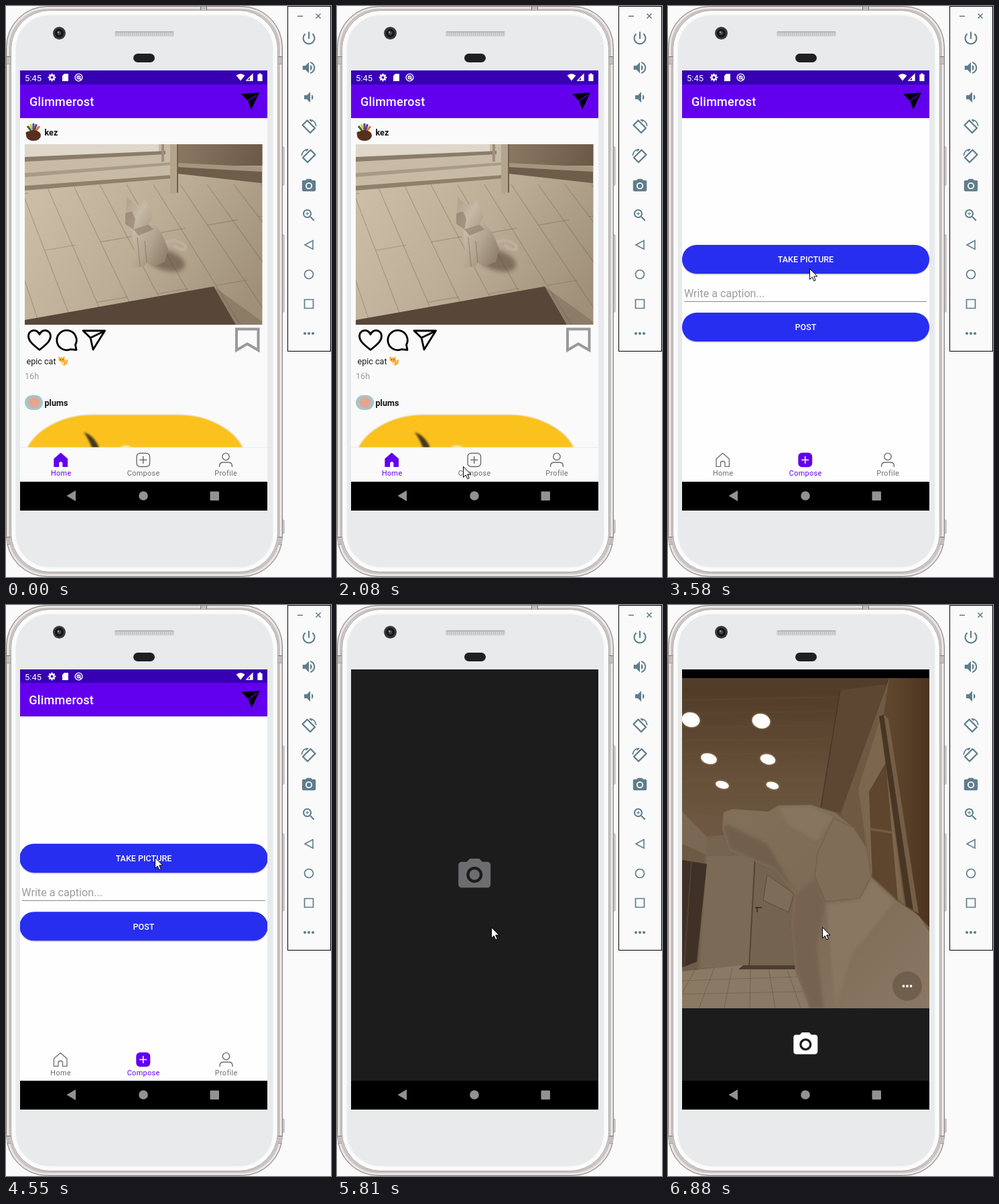
Recreate the animation shown at these times as an HTML page with a canvas. Size 485x851 px, loop 8000 ms.

```html
<!DOCTYPE html>
<html lang="en">
<head>
<meta charset="utf-8">
<title>Phone emulator demo</title>
<style>
html, body { margin: 0; width: 100%; height: 100%; overflow: hidden; background: #fafafa; }
canvas { display: block; width: 485px; height: 851px; }
</style>
</head>
<body>
<canvas id="stage" width="485" height="851"></canvas>
<script>
const c = document.getElementById('stage').getContext('2d');
const LOOP = 8000;
const PURPLE = '#6200ee', DARK = '#1c1c1c', GREY = '#6c6c6c', SLATE = '#5f7d8b';

// [time, x, y] of the pointer tip
const POINTER = [
  [1000, 184, 799], [1150, 152, 722], [1270, 81, 600], [1390, 118, 530], [1550, 150, 524],
  [1690, 178, 556], [1810, 195, 622], [1930, 189, 670], [2080, 188, 686],
  [3040, 186, 650], [3160, 185, 617], [3310, 187, 510], [3430, 192, 418], [3580, 211, 391],
  [3730, 217, 382], [3860, 222, 376], [5250, 226, 424], [5370, 230, 480]
];

const CAMERA = 'M9 2L7.17 4H4c-1.1 0-2 .9-2 2v12c0 1.1.9 2 2 2h16c1.1 0 2-.9 2-2V6c0-1.1-.9-2-2-2h-3.17L15 2H9zm3 15c-2.76 0-5-2.24-5-5s2.24-5 5-5 5 2.24 5 5-2.24 5-5 5z';
const POWER = 'M13 3h-2v10h2V3zm4.83 2.17l-1.42 1.42C17.99 7.86 19 9.81 19 12c0 3.87-3.13 7-7 7s-7-3.13-7-7c0-2.19 1.01-4.14 2.58-5.42L6.17 5.17C4.23 6.82 3 9.26 3 12c0 4.97 4.03 9 9 9s9-4.03 9-9c0-2.74-1.23-5.18-3.17-6.83z';
const LOUD = 'M3 9v6h4l5 5V4L7 9H3zm13.5 3c0-1.77-1.02-3.29-2.5-4.03v8.05c1.48-.73 2.5-2.25 2.5-4.02zM14 3.23v2.06c2.89.86 5 3.54 5 6.71s-2.11 5.85-5 6.71v2.06c4.01-.91 7-4.49 7-8.77s-2.99-7.86-7-8.77z';
const QUIET = 'M18.5 12c0-1.77-1.02-3.29-2.5-4.03v8.05c1.48-.73 2.5-2.25 2.5-4.02zM5 9v6h4l5 5V4L9 9H5z';
const ZOOM = 'M15.5 14h-.79l-.28-.27C15.41 12.59 16 11.11 16 9.5 16 5.91 13.09 3 9.5 3S3 5.91 3 9.5 5.91 16 9.5 16c1.61 0 3.09-.59 4.23-1.57l.27.28v.79l5 4.99L20.49 19l-4.99-5zm-6 0C7.01 14 5 11.99 5 9.5S7.01 5 9.5 5 14 7.01 14 9.5 11.99 14 9.5 14zM12 10h-2v2H9v-2H7V9h2V7h1v2h2v1z';

function box(x, y, w, h, fill) { c.fillStyle = fill; c.fillRect(x, y, w, h); }

function shape(path, fill, line, width = 1) {
  const p = path instanceof Path2D ? path : new Path2D(path);
  if (fill) { c.fillStyle = fill; c.fill(p, 'evenodd'); }
  if (line) { c.strokeStyle = line; c.lineWidth = width; c.stroke(p); }
}

function round(x, y, w, h, r, fill, line, width) {
  const p = new Path2D();
  p.roundRect(x, y, w, h, r);
  shape(p, fill, line, width);
}

function oval(x, y, rx, ry, fill, line, width, turn = 0) {
  const p = new Path2D();
  p.ellipse(x, y, rx, ry, turn, 0, 7);
  shape(p, fill, line, width);
}

const dot = (x, y, r, fill, line, width) => oval(x, y, r, r, fill, line, width);

function icon(path, x, y, size, fill) {
  c.save();
  c.translate(x, y);
  c.scale(size, size);
  c.translate(-12, -12);
  shape(path, fill);
  c.restore();
}

function camera(x, y, size, fill) {
  icon(CAMERA, x, y, size, fill);
  dot(x, y, 3.2 * size, fill);
}

function rotateIcon(y, flip) {
  c.save();
  c.translate(452, y);
  c.scale(flip, 1);
  c.lineJoin = 'round';
  shape('M-2.5 -9.5L9 2L2 9L-9.5 -2.5Z', null, SLATE, 2.3);
  shape('M1 -10.500Q9.500 -10 10.800 -1M1 -10.500L4.500 -7.500', null, SLATE, 1.6);
  c.restore();
}

function text(str, x, y, size, fill, { weight = 400, space = 0, align = 'left' } = {}) {
  c.font = `${weight} ${size}px Roboto, sans-serif`;
  c.letterSpacing = space + 'px';
  c.textAlign = align;
  c.fillStyle = fill;
  c.fillText(str, x, y);
  c.letterSpacing = '0px';
}

function fade(x0, y0, x1, y1, ...stops) {
  const g = c.createLinearGradient(x0, y0, x1, y1);
  stops.forEach((s, i) => g.addColorStop(i / (stops.length - 1), s));
  return g;
}

function clipped(x, y, w, h, draw) {
  c.save();
  c.beginPath();
  c.rect(x, y, w, h);
  c.clip();
  draw();
  c.restore();
}

function soft(blur, draw) {
  c.save();
  c.filter = `blur(${blur}px)`;
  draw();
  c.restore();
}

function phone() {
  for (const [y, h] of [[210, 57], [341, 115], [766, 20]])
    round(411, y, 4, h, 1, '#d6d1d1', '#aaa5a5');
  round(.5, .5, 412, 850, 61, '#d3cdcc', '#8a8585');
  round(3, 3, 407, 845, 59, null, '#eeeaea', 2);
  round(5.5, 5, 402, 840, 58, null, '#b9b3b3', 1);
  for (const y of [75, 791]) {
    for (const x of [1, 406]) {
      box(x, y, 6, 12, '#c3bdbd');
      box(x, y, 6, 1, '#7d7878');
      box(x, y + 11, 6, 1, '#a5a0a0');
    }
  }
  box(291, 1, 9, 4, '#c3bdbd');
  box(290, 1, 1, 5, '#777');
  box(299, 1, 1, 5, '#777');
  round(7.5, 6.5, 398, 837, 58, '#fdfdfd', '#aaa5a5');
  c.save();
  c.shadowColor = '#e8eaec';
  c.shadowBlur = 4;
  round(15, 14, 383, 822, 50, '#e8eaec');
  c.restore();
  dot(79.5, 40.5, 9.5, '#3a3a3c');
  dot(79.5, 40.5, 6.5, '#161618');
  dot(79.5, 40.5, 3, '#454a50');
  dot(78, 39, 1.2, '#a0a5aa');
  round(162, 37.5, 89, 8, 2, '#d2d3d5');
  box(163, 38, 87, 1.3, '#a5a6a9');
  for (let x = 164; x < 250; x += 3) box(x, 40, 1, 4, '#bdbec1');
  round(190, 71, 32, 13, 6.5, '#202022');
}

function toolbar() {
  box(420, 0, 65, 515, '#000');
  box(421, 1, 63, 513, '#fafafa');
  box(435, 14.5, 8, 1.5, SLATE);
  shape('M462.5 11.5l7 7m0-7l-7 7', null, SLATE, 1.6);
  icon(POWER, 452, 48, 1.05, SLATE);
  icon(LOUD, 452, 92, 1.03, SLATE);
  icon(QUIET, 452, 136, 1, SLATE);
  rotateIcon(180, 1);
  rotateIcon(224, -1);
  camera(452, 268, 1.02, SLATE);
  icon(ZOOM, 452, 312, 1, SLATE);
  shape('M446 356L458 349.5V362.5Z', null, SLATE, 1.6);
  dot(452, 400, 6.5, null, SLATE, 1.7);
  shape('M445.5 437.5h13v13h-13z', null, SLATE, 1.7);
  for (const x of [446, 452, 458]) dot(x, 488, 2.1, SLATE);
}

function status() {
  text('5:45', 28, 111.5, 13, '#fff');
  dot(68.5, 106.5, 3.2, null, '#fff', 2.4);
  for (let i = 0; i < 8; i++) {
    const a = i * Math.PI / 4;
    dot(68.5 + 4.9 * Math.cos(a), 106.5 + 4.9 * Math.sin(a), 1.15, '#fff');
  }
  shape('M87 101h6v11h-9v-8z', '#fff');
  dot(108.5, 106.5, 5.4, null, '#fff', 1.4);
  dot(108.5, 106.5, 2.4, null, '#fff', 1.3);
  shape('M106 104l6 6', null, '#fff', 1.3);
  shape('M343.5 103.5Q350 98.5 356.5 103.5L350 111.5Z', '#fff');
  shape('M359 111L368 101.8V111Z', null, '#fff', 1.3);
  shape('M364 106l4-4v9h-4z', '#fff');
  shape('M377.2 100.5h3.4v1.5h2v10h-7.2v-10h1.8z', '#fff');
}

function appBar() {
  box(21, 166, 369, 3, fade(0, 166, 0, 169, 'rgba(0,0,0,.14)', 'rgba(0,0,0,0)'));
  box(21, 116, 369, 51, PURPLE);
  text('Glimmerost', 35, 149, 18, '#fff', { weight: 500, space: .24 });
  shape('M351 131L378 129L366 154.5L361 141.5Z', '#000');
  shape('M361 141.5L373.5 133', null, PURPLE, 1.2);
}

function tabs(active) {
  const tint = i => i === active ? PURPLE : GREY;
  box(21, 658, 369, 51, active ? '#fefefe' : '#fafafa');
  if (!active) box(21, 657.5, 369, 1, '#ececec');
  ['Home', 'Compose', 'Profile'].forEach((s, i) =>
    text(s, 82.2 + 123 * i, 699.5, 10.8, tint(i), { space: .38, align: 'center' }));
  c.lineJoin = 'round';
  const home = 'M72 675L81.7 666.6L91.4 675V686.4H85V681Q85 678.5 81.7 678.5Q78.5 678.5 78.5 681V686.4H72Z';
  shape(home, active ? null : PURPLE, tint(0), 1.3);
  round(195, 666.5, 19.5, 20, 5, active ? PURPLE : null, tint(1), 1.4);
  shape('M204.7 671v11m-5.5-5.5h11', null, active ? '#fff' : GREY, 1.5);
  dot(328, 671.6, 5.2, null, GREY, 1.4);
  shape('M318.6 687v-1.5q0-5.2 5.4-5.2h8q5.4 0 5.4 5.2v1.5', null, GREY, 1.4);
  c.lineJoin = 'miter';
}

function systemBar() {
  box(21, 709, 369, 43, '#000');
  shape('M90.5 730L104 722V738Z', '#929292');
  dot(205, 730, 6.8, '#929292');
  round(304.5, 723.5, 13.5, 13.5, 1, '#929292');
}

function catPhoto() {
  clipped(28, 206, 354.5, 269, () => {
    box(28, 206, 355, 269, fade(60, 250, 360, 450, '#cbbda6', '#bcad97', '#a09079'));
    // floor boards
    for (let i = 0; i < 11; i++) {
      const x = i * 40 - 20, lean = 35 + i * 5;
      shape(`M${x} 266L${x + lean * 2} 475`, null, 'rgba(92,76,58,.3)', 1.2);
      const t = (i * 37 % 80) / 100 + .1;
      shape(`M${x + lean * 2 * t} ${266 + 209 * t}l46 -8`, null, 'rgba(92,76,58,.3)', 1.2);
    }
    // window, sill and skirting
    shape('M28 206H246V256L28 274Z', '#c8bba5');
    shape('M28 206H228V217L28 227Z', '#ded7ca');
    shape('M28 225L238 216V221L28 232Z', '#8b7c6a');
    shape('M28 249L246 233V237L28 255Z', '#a99a85');
    shape('M28 268L246 252V257L28 275Z', '#8f7f6b');
    // furniture
    box(257, 206, 126, 32, fade(257, 206, 382, 238, '#8b7863', '#6b5947'));
    shape('M257 234L382 240V247L257 240Z', '#a6957e');
    shape('M257 240L382 247V264L257 250Z', '#6f5d4b');
    box(245, 206, 12, 73, '#b5a48d');
    box(255, 206, 2, 72, '#6f5e4c');
    box(232, 206, 4, 26, '#a08f7a');
    shape('M28 468L310 418L343 475H28Z', '#584639');
    shape('M310 418L382 470V475H343Z', 'rgba(95,78,62,.3)');
    // cat
    soft(3, () => oval(238, 379, 30, 15, 'rgba(82,65,49,.55)', null, 1, .3));
    shape('M232 356Q248 346 257 351Q271 356 267 363Q258 364 250 356', null, '#beb09b', 4.5);
    shape('M187 324L216 318L232 338L242 362L237 381L222 388L210 382L206 389L188 390L191 360Z',
      fade(190, 340, 240, 366, '#c6b9a5', '#b3a48f', '#93836f'));
    shape('M196 345L200 388M207 350L210 382', null, 'rgba(110,93,74,.4)', 1.5);
    shape('M180 284L192 295L201 296L207 288L215 301L218 316L211 328L190 334L178 325L179 307Z',
      fade(180, 300, 217, 322, '#b5a692', '#c6b9a5', '#b0a18c'));
    shape('M178 309L188 306L193 318L190 333L178 325Z', 'rgba(120,102,83,.45)');
    shape('M190 333L213 326L220 333L198 342Z', 'rgba(110,93,74,.4)');
  });
}

function feed() {
  box(21, 167, 369, 491, '#fafafa');
  // avatars
  ['#2f6b32', '#e6c524', '#3550a8', '#7a2c8c', '#d87722'].forEach((col, i) =>
    shape(`M41 190l${-9 + i * 4.5} ${-11 - 4 * Math.sin(i * .8)}`, null, col, 3));
  oval(41, 193, 11, 8, '#57301d');
  oval(33, 190, 3.5, 3, '#57301d');
  text('kez', 57.5, 193, 12.6, '#111', { weight: 700 });
  catPhoto();

  // actions
  c.lineJoin = 'round';
  shape('M50 512.5C38 503 33.5 498.5 33.5 492C33.5 486.5 37.5 483.5 41.5 483.5C46 483.5 48.5 486 50 489.5C51.5 486 54 483.5 58.5 483.5C62.5 483.5 66.5 486.5 66.5 492C66.5 498.5 62 503 50 512.5Z', null, '#000', 2.8);
  shape('M105 512.5L96 511.7A14.7 14.7 0 1 1 103.5 505Z', null, '#000', 2.8);
  shape('M115 484H147.5L130 512L126 494.5ZM126 494.5L147 484.5', null, '#000', 2.8);
  c.lineJoin = 'miter';
  shape('M344 481.5H376.5V513L360 503.5L344 513Z', null, '#999', 4);

  text('epic cat', 30.5, 533.5, 12.6, '#1a1a1a');
  // cat emoji
  shape('M86 535q6-1 5-8', null, '#f0a22e', 2);
  oval(86, 531, 3.5, 4.5, '#f5b23d');
  shape('M78.5 522l3 2h3l3-2v6q-4.5 5-9 0z', '#f5b23d');
  dot(81.5, 527, .8, '#4a3320');
  dot(85, 527, .8, '#4a3320');
  box(83, 531, 3, 4, '#fbe1a4');
  text('16h', 28, 555.5, 12.6, '#9a9a9a');

  round(28, 580, 27, 22, 11, '#a9c4c8');
  dot(42, 591, 8, '#e5a58e');
  text('plums', 57.5, 595.5, 12.6, '#111', { weight: 700 });
  clipped(21, 604, 369, 54, () => {
    shape('M30 662C42 632 84 609 128 609H258C302 609 344 632 355 662Z', '#fbc21d', '#ece3c4', 1.5);
    soft(1.5, () => {
      shape('M116 635Q133 641 140 661H129Q125 648 116 635Z', '#43371c');
      oval(179, 659, 8, 4, '#fff3c4');
    });
  });
}

function button(y, label, glow) {
  round(21, y + 1.5, 369, 43, 21.5, 'rgba(0,0,0,.2)');
  round(21, y, 369, 43, 21.5, '#272ef0');
  if (glow) round(21, y, 369, 43, 21.5, 'rgba(255,255,255,.22)');
  text(label, 205.5, y + 26.3, 12.5, '#fff', { weight: 500, align: 'center' });
}

function compose(t) {
  box(21, 167, 369, 491, '#fefefe');
  button(356, 'TAKE PICTURE', t >= 4000 && t < 4120);
  text('Write a caption...', 24, 434, 16.1, '#9c9c9c');
  box(24.5, 440, 361.5, 1, '#898989');
  button(457, 'POST');
}

function app(t) {
  const active = t < 2530 ? 0 : 1;
  clipped(21, 96, 369, 656, () => {
    c.save();
    if (t >= 4550) {
      c.translate(205.5, 424);
      c.scale(1.004, 1.004);
      c.translate(-205.5, -424);
    }
    if (active) compose(t); else feed();
    appBar();
    tabs(active);
    if (t >= 2530 && t < 2790) {
      const [r, alpha] = t < 2670 ? [50, .14] : [67, .07];
      clipped(21, 658, 369, 51, () => dot(205, 683, r, `rgba(98,0,238,${alpha})`));
    }
    c.restore();
    box(21, 96, 369, t >= 4550 ? 20 : 21, '#3700b3');
    status();
  });
}

function roomPhoto() {
  clipped(21, 109, 369, 492, () => {
    // ceiling
    box(21, 109, 369, 492, fade(0, 109, 0, 400, '#4e3926', '#665039', '#6f5c48'));
    for (let i = 0; i < 9; i++)
      shape(`M21 ${122 + i * 20}L257 ${116 + i * 21}`, null, 'rgba(120,95,70,.1)', 3);
    shape('M21 109H330L318 121L257 127L21 122Z', '#533d2a');
    shape('M257 127L326 118L258 310L228 302Z', '#5d4632');
    shape('M257 127L228 302', null, '#49362a', 1.5);
    // right wall and doorway
    shape('M330 109H390V480L300 420L258 310Z', '#6f5942');
    shape('M330 109H390V480L366 455L322 163Z', fade(330, 0, 390, 0, '#5f472f', '#4b331f'));
    shape('M316 172L284 273L302 400L352 445Z', '#7c664e');
    shape('M300 278L325 235L343 440L305 405Z', '#5e452d');
    shape('M302 332L334 337V341L303 336Z', '#745a40');
    shape('M315 166L322 163L366 455L355 449Z', '#493524');
    shape('M322 163L329 170L374 460L366 455Z', '#745e47');
    // back wall
    shape('M21 305L90 318L85 345L57 344L21 318Z', '#6d5742');
    shape('M57 345L95 342L200 400V545H45Z', '#75644f');
    shape('M58 374H128L120 540H48Z', '#7b6a55');
    shape('M130 376L195 392V541H121Z', '#74634e');
    shape('M130 376L121 541', null, '#4d3e2d', 1.5);
    shape('M148 402L142 440L180 458L188 430Z', '#7d6c57', '#5c4b39', 1);
    shape('M130 451h10m-7 0v7', null, '#37291d', 1.5);
    shape('M21 308L57 344V372L21 356Z', '#7b6854');
    shape('M21 380L58 386L43 532L21 540Z', '#3f3125');
    shape('M35 382L24 538', null, '#584534', 1.5);
    shape('M21 546L110 537L190 541L215 601H21Z', '#8a7964');
    for (let i = 0; i < 6; i++)
      shape(`M${42 + i * 27} 541L${8 + i * 38} 601`, null, 'rgba(65,49,35,.3)', 1);
    shape('M21 560L196 554M21 580L206 576', null, 'rgba(65,49,35,.25)', 1);
    shape('M112 537H190V543H105Z', '#4c3d30');

    for (const [x, y, r] of [[34, 171, 13.5], [139, 173, 13.5], [61, 229, 12], [149, 230, 11.5], [81, 268, 10], [156, 269, 9.5]]) {
      c.save();
      c.shadowColor = '#c9a880';
      c.shadowBlur = 3;
      oval(x, y, r, r * (.8 - (y - 171) * .0027), '#fff', null, 1, .25);
      c.restore();
    }

    // dog
    shape('M81 334L83 309L96 304L150 308L164 299L214 298L250 310L277 332L297 363L304 407L340 440L375 464L390 488V601H211L190 545L184 480L188 430L160 395L92 366Z',
      fade(90, 300, 370, 600, '#826f5a', '#7d6b56', '#8a7763'));
    soft(2, () => {
      shape('M83 333L86 326L148 356L190 428L160 393L93 364Z', '#715f4c');
      shape('M164 301L214 300L246 316L222 352L179 327Z', '#88755f');
      shape('M190 432L220 408L234 444L222 510L232 601H213L192 545L186 480Z', '#756350');
      shape('M236 446L285 440L304 409L338 442L275 520L250 601Z', '#8a7762');
    });
    shape('M247 318L277 332L297 363L303 405L286 437L235 442L219 404L223 370Z', '#806d58', '#725f4a', 1.2);
  });
}

function cameraApp(t) {
  box(21, 96, 369, 613, DARK);
  if (t >= 6760) {
    roomPhoto();
    box(21, 96, 369, 13, '#000');
    box(21, 601, 369, 108, DARK);
    dot(357, 568, 22, '#715f4e');
    for (const x of [351.5, 357, 362.5]) dot(x, 568, 1.9, '#fff');
    camera(205.3, 655, 1.8, '#fff');
    if (t < 6880) box(21, 96, 369, 574, 'rgba(28,28,28,.5)');
  } else if (t >= 5680) {
    camera(205.2, 402, 2.4, t < 5810 ? '#454547' : '#6d6d70');
  }
}

function opening(t) {
  const early = t < 4830, edge = early ? 1 : 0;
  if (early) {
    app(t);
    box(21, 96, 369, 613, 'rgba(0,0,0,.55)');
  }
  box(21 + edge, 96 + edge * 1.5, 369 - 2 * edge, 613, DARK);
  box(21, 707, 369, 3, '#000');
  c.globalAlpha = early ? 1 : .5;
  status();
  c.globalAlpha = 1;
}

function pointer(t) {
  const at = POINTER.filter(p => p[0] <= t).pop();
  if (!at) return;
  c.save();
  c.translate(at[1] + .5, at[2] + .5);
  shape('M0 0V16L3.7 12.5L6.3 18.3L8.7 17.2L6.2 11.5H11.3Z', '#fff', '#000', 1);
  c.restore();
}

function draw(t) {
  box(0, 0, 485, 851, '#fafafa');
  phone();
  toolbar();
  if (t < 4700) app(t);
  else if (t < 4970) opening(t);
  else cameraApp(t);
  systemBar();
  pointer(t);
}

const start = performance.now();
function tick() {
  draw((performance.now() - start) % LOOP);
  requestAnimationFrame(tick);
}
tick();
</script>
</body>
</html>
```
